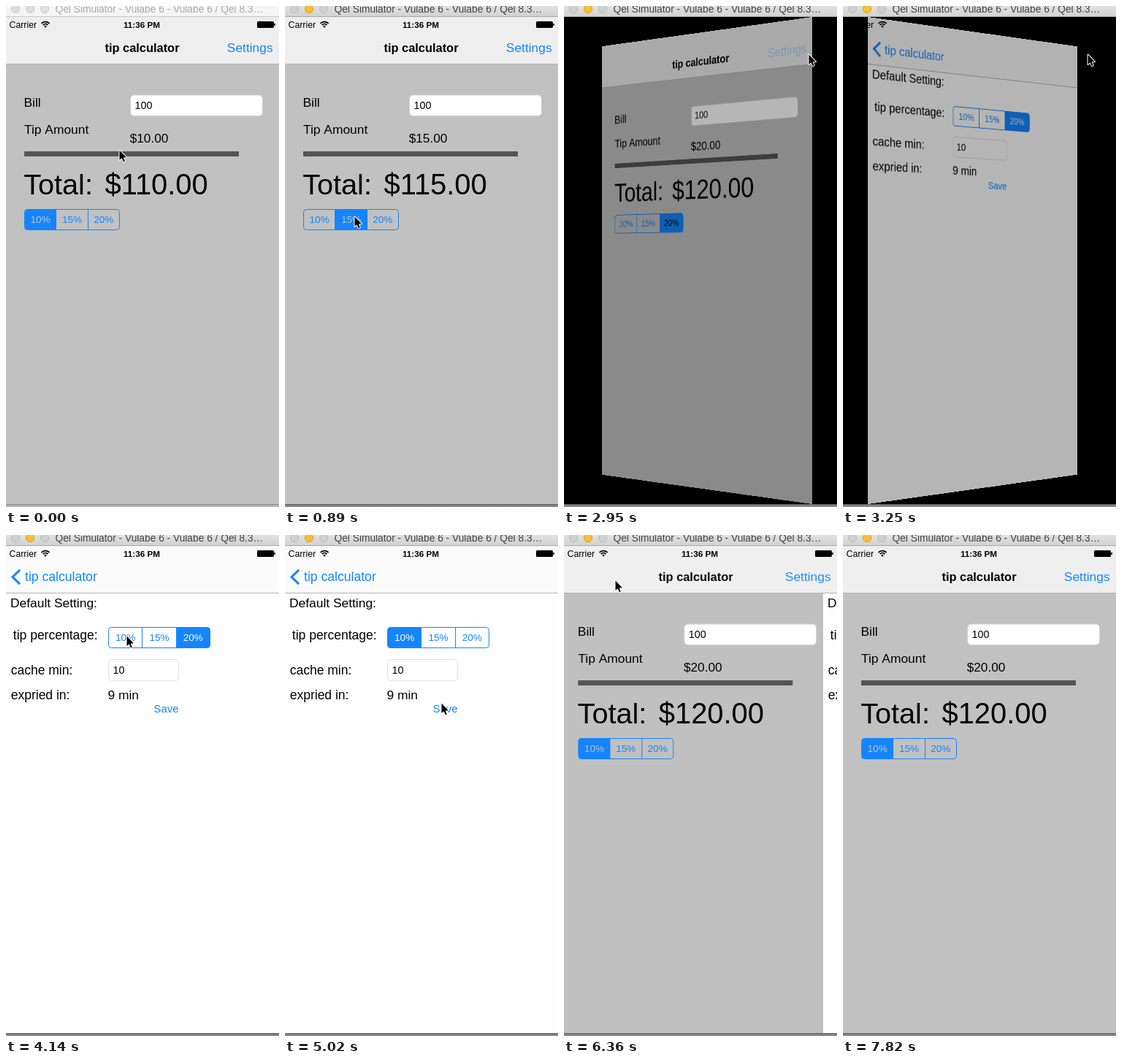
Animation, 374 px wide and 686 px high, one loop 8 s. Source, as an HTML page with a canvas:

```html
<!DOCTYPE html>
<html lang="en">
<head>
<meta charset="utf-8">
<title>Tip calculator</title>
<style>
html, body { margin: 0; width: 100%; height: 100%; overflow: hidden; background: #000; }
canvas { display: block; width: 374px; height: 686px; }
</style>
</head>
<body>
<canvas id="stage" width="374" height="686"></canvas>
<script>
const W = 374, H = 686, TOP = 15, BOTTOM = 682, NAV = 79;
const LOOP = 8000, STEP = 147.6;
const BLUE = '#1585fe', GREY = '#c1c1c1';
const FONT = '"Liberation Sans", Arial, sans-serif';
const RATES = [10, 15, 20];

const stage = document.getElementById('stage').getContext('2d');
const sheet = document.createElement('canvas');
sheet.width = W * 2;
sheet.height = (BOTTOM - TOP) * 2;
const sheetCtx = sheet.getContext('2d');

// Pointer path: step, x, y
const PATH = [
  [0, 155, 197], [1, 154, 200], [2, 146, 228], [4, 95, 288], [8, 95, 288],
  [10, 132, 289], [11, 132, 289], [13, 371, 108], [15, 335, 67], [23, 335, 66],
  [24, 327, 69], [27, 165, 138], [30, 165, 138], [32, 190, 205], [34, 214, 230],
  [36, 214, 230], [39, 75, 68], [40, 70, 62], [43, 70, 62], [45, 85, 180],
  [48, 145, 414], [49, 178, 250], [50, 197, 105]
];

const clamp = v => Math.max(0, Math.min(1, v));
const mix = (a, b, p) => a + (b - a) * p;

function text(c, str, x, y, size, color = '#000', weight = 'normal', align = 'left') {
  c.font = `${weight} ${size}px ${FONT}`;
  c.textAlign = align;
  c.fillStyle = color;
  c.fillText(str, x, y);
}

function box(c, x, y, w, h, color) {
  c.fillStyle = color;
  c.fillRect(x, y, w, h);
}

function rounded(c, x, y, w, h, r, fill, line) {
  c.beginPath();
  c.roundRect(x, y, w, h, r);
  if (fill) { c.fillStyle = fill; c.fill(); }
  if (line) { c.strokeStyle = line; c.lineWidth = 1; c.stroke(); }
}

function faded(c, alpha, draw) {
  c.save();
  c.globalAlpha *= alpha;
  draw();
  c.restore();
}

function segments(c, x, y, w, selected, ink) {
  const part = w / 3;
  c.save();
  rounded(c, x, y, w, 28, 4);
  c.clip();
  box(c, x + part * selected, y, part, 28, BLUE);
  c.restore();
  rounded(c, x, y, w, 28, 4, null, BLUE);
  RATES.forEach((rate, i) => {
    if (i) box(c, Math.round(x + part * i - 0.5), y, 1, 28, BLUE);
    text(c, rate + '%', x + part * (i + 0.5), y + 18.5, 13.6, i === selected ? ink : BLUE, 'normal', 'center');
  });
}

function chevron(c, alpha) {
  faded(c, alpha, () => {
    c.beginPath();
    c.moveTo(19, 47.8);
    c.lineTo(9, 57.5);
    c.lineTo(19, 67.2);
    c.strokeStyle = BLUE;
    c.lineWidth = 3;
    c.stroke();
  });
}

function navBack(c, color) {
  box(c, 0, TOP, W, NAV - TOP, color);
  box(c, 0, NAV, W, 1, '#b4b4b4');
}

function billBody(c, s) {
  box(c, 0, NAV + 1, W, BOTTOM - NAV - 1, GREY);
  text(c, 'Bill', 24.5, 137.5, 17.4);
  rounded(c, 170.5, 122, 181, 28.5, 5, '#fff', '#d0d0d0');
  text(c, '100', 176.5, 140.5, 14.3);
  text(c, 'Tip Amount', 25, 174.5, 17.4);
  text(c, `$${s.tip}.00`, 169.7, 187, 17.2);
  box(c, 25, 199, 294, 7, '#555');
  text(c, 'Total:', 24.3, 258, 39.6);
  text(c, `$${100 + s.tip}.00`, 135.5, 258, 39.9);
  segments(c, 25.5, 278.5, 130, s.rate, s.ink);
}

function billNav(c, s) {
  navBack(c, '#eeeeee');
  text(c, 'tip calculator', 186.5, 63, 16.4, '#000', 'bold', 'center');
  faded(c, s.settingsAlpha, () => text(c, 'Settings', 302.8, 63, 17.4, BLUE));
}

function prefsBody(c, s) {
  box(c, 0, NAV + 1, W, BOTTOM - NAV - 1, '#fefefe');
  text(c, 'Default Setting:', 6, 98.5, 17.4);
  text(c, 'tip percentage:', 9.8, 143, 17.5);
  segments(c, 140.5, 126.5, 139, s.prefRate, '#fefefe');
  text(c, 'cache min:', 6.7, 190.5, 17.5);
  rounded(c, 140.5, 170.5, 96, 29, 5, '#fff', '#dedede');
  text(c, '10', 146.5, 189.5, 14.3);
  text(c, 'expried in:', 6.7, 224.5, 17.5);
  text(c, '9 min', 139.5, 224.5, 17.4);
  faded(c, s.saveAlpha, () => text(c, 'Save', 202.5, 243, 15, BLUE));
}

function prefsNav(c, s) {
  navBack(c, '#fafafa');
  chevron(c, s.backAlpha);
  text(c, 'tip calculator', s.backX, 63, 17.6, BLUE);
}

function billPage(c, s) { billBody(c, s); billNav(c, s); }
function prefsPage(c, s) { prefsBody(c, s); prefsNav(c, s); }

// Turns a page about its vertical axis; the nearer edge keeps full height.
function flip(c, s, p) {
  box(c, 0, TOP, W, BOTTOM - TOP, '#000');
  const angle = Math.PI * p;
  const cos = Math.abs(Math.cos(angle)), sin = Math.sin(angle);
  if (cos < 0.01) return;
  const first = p < 0.5, near = first ? 1 : -1;
  const half = W / 2, depth = 1577, mid = (TOP + BOTTOM) / 2, tall = BOTTOM - TOP;
  sheetCtx.setTransform(2, 0, 0, 2, 0, -2 * TOP);
  (first ? billPage : prefsPage)(sheetCtx, s);
  box(sheetCtx, 0, 0, W, H, `rgba(0,0,0,${0.5 * sin})`);

  const toPage = x => (x * (depth + half * sin)) / (cos * depth + x * near * sin);
  c.imageSmoothingQuality = 'high';
  for (let x = 0; x < W; x++) {
    const a = Math.max(-half, toPage(x - half));
    const b = Math.min(half, toPage(x + 1 - half));
    if (b - a < 0.05) continue;
    const scale = depth / (depth + (half - near * (a + b) / 2) * sin);
    c.drawImage(sheet, (a + half) * 2, 0, (b - a) * 2, tall * 2,
      x, mid - tall * scale / 2, 1, tall * scale);
  }
}

// Slides the preferences off to the right over the bill page.
function pop(c, s, p) {
  const edge = W * p;
  c.save();
  c.translate(-W * 0.3 * (1 - p), 0);
  billBody(c, s);
  c.restore();
  box(c, 0, NAV, W, BOTTOM - NAV, `rgba(0,0,0,${0.1 * (1 - p)})`);
  const shade = c.createLinearGradient(edge - 8, 0, edge, 0);
  shade.addColorStop(0, 'rgba(0,0,0,0)');
  shade.addColorStop(1, `rgba(0,0,0,${0.15 * (1 - p)})`);
  box(c, edge - 8, NAV, 8, BOTTOM - NAV, shade);
  c.save();
  c.translate(edge, 0);
  prefsBody(c, s);
  c.restore();

  const tone = Math.round(mix(250, 238, p));
  navBack(c, `rgb(${tone},${tone},${tone})`);
  chevron(c, s.backAlpha * (1 - p));
  const x = mix(s.backX, 135, p);
  faded(c, 1 - p, () => text(c, 'tip calculator', x, 63, 17.6, BLUE));
  faded(c, p, () => {
    text(c, 'tip calculator', x, 63, 16.4, '#000', 'bold');
    text(c, 'Settings', 302.8, 63, 17.4, BLUE);
  });
}

function statusBar(c) {
  text(c, 'Carrier', 4.5, 29.5, 12.3);
  text(c, '11:36 PM', 186, 29.5, 11.7, '#000', 'bold', 'center');
  c.strokeStyle = '#000';
  c.lineWidth = 1.8;
  [4.6, 7.6].forEach(r => {
    c.beginPath();
    c.arc(54, 29.2, r, -Math.PI * 0.76, -Math.PI * 0.24);
    c.stroke();
  });
  c.beginPath();
  c.moveTo(54, 30);
  c.arc(54, 29.4, 2.6, -Math.PI * 0.76, -Math.PI * 0.24);
  c.fillStyle = '#000';
  c.fill();
  rounded(c, 344, 21, 23, 9, 1.5, '#000');
  rounded(c, 367.3, 23.7, 1.5, 3.6, 0.7, '#000');
}

function windowFrame(c, active) {
  const bar = c.createLinearGradient(0, 0, 0, 14);
  bar.addColorStop(0, active ? '#e0e0e0' : '#f6f6f6');
  bar.addColorStop(1, active ? '#d2d2d2' : '#f4f4f4');
  box(c, 0, 0, W, 14, bar);
  box(c, 0, 14, W, 1, active ? '#a9a9a9' : '#c9c9c9');
  [13, 33, 53].forEach((x, i) => {
    const lit = active && i === 1;
    c.beginPath();
    c.arc(x, 4, 5.6, 0, Math.PI * 2);
    c.fillStyle = lit ? '#fdbe2f' : active ? '#d0d0d0' : '#dedede';
    c.fill();
    c.strokeStyle = lit ? '#dfa023' : active ? '#b9b9b9' : '#cbcbcb';
    c.lineWidth = 1;
    c.stroke();
  });
  text(c, 'Qel Simulator - Vulabe 6 - Vulabe 6 / Qel 8.3…', 67.5, 9, 13.75, active ? '#444' : '#a9a9a9');
  const foot = c.createLinearGradient(0, BOTTOM, 0, H);
  foot.addColorStop(0, active ? '#5c5c5c' : '#858585');
  foot.addColorStop(0.4, active ? '#7c7c7c' : '#adadad');
  foot.addColorStop(1, active ? '#959595' : '#bdbdbd');
  box(c, 0, BOTTOM, W, H - BOTTOM, foot);
}

function pointer(c, k) {
  let i = PATH.findIndex(p => p[0] >= k);
  if (i < 0) i = PATH.length - 1;
  const b = PATH[i], a = PATH[Math.max(0, i - 1)];
  const p = b[0] > a[0] ? clamp((k - a[0]) / (b[0] - a[0])) : 1;
  c.save();
  c.translate(Math.round(mix(a[1], b[1], p)) + 0.5, Math.round(mix(a[2], b[2], p)));
  c.beginPath();
  c.moveTo(0, 0.5);
  [[0, 14], [3.1, 11.2], [5.4, 16.2], [7.3, 15.4], [5.2, 10.5], [9.4, 10.2]].forEach(q => c.lineTo(...q));
  c.closePath();
  c.lineJoin = 'round';
  c.strokeStyle = '#fff';
  c.lineWidth = 2;
  c.stroke();
  c.fillStyle = '#000';
  c.fill();
  c.restore();
}

function render(time) {
  const k = Math.floor((time + 4) / STEP), t = k * STEP;
  const turn = (1 - Math.cos(Math.PI * clamp((t - 2745) / 710))) / 2;
  const spring = 0.016 * Math.max(0, t - 41 * STEP);
  const slide = k >= 45 ? 1 : 1 - (1 + spring) * Math.exp(-spring);
  const turning = turn > 0 && turn < 1;
  const touched = k < 6 ? 0 : k < 11 ? 1 : 2;
  const s = {
    rate: k >= 42 ? 0 : touched,
    tip: RATES[touched],
    ink: turning ? '#000' : GREY,
    prefRate: k < 29 ? 2 : 0,
    settingsAlpha: k >= 17 && k < 25 ? 0.3 : 1,
    saveAlpha: k === 35 ? 0.3 : 1,
    backAlpha: k >= 41 ? 0.22 : 1,
    backX: k >= 41 ? 28 : 26
  };

  stage.clearRect(0, 0, W, H);
  if (turning) flip(stage, s, turn);
  else if (turn === 0 || slide === 1) billPage(stage, s);
  else if (slide === 0) prefsPage(stage, s);
  else pop(stage, s, slide);
  statusBar(stage);
  windowFrame(stage, k >= 4);
  if (k < 53) pointer(stage, k);
}

const begin = performance.now();
function tick() {
  render((performance.now() - begin) % LOOP);
  requestAnimationFrame(tick);
}
tick();
</script>
</body>
</html>
```
